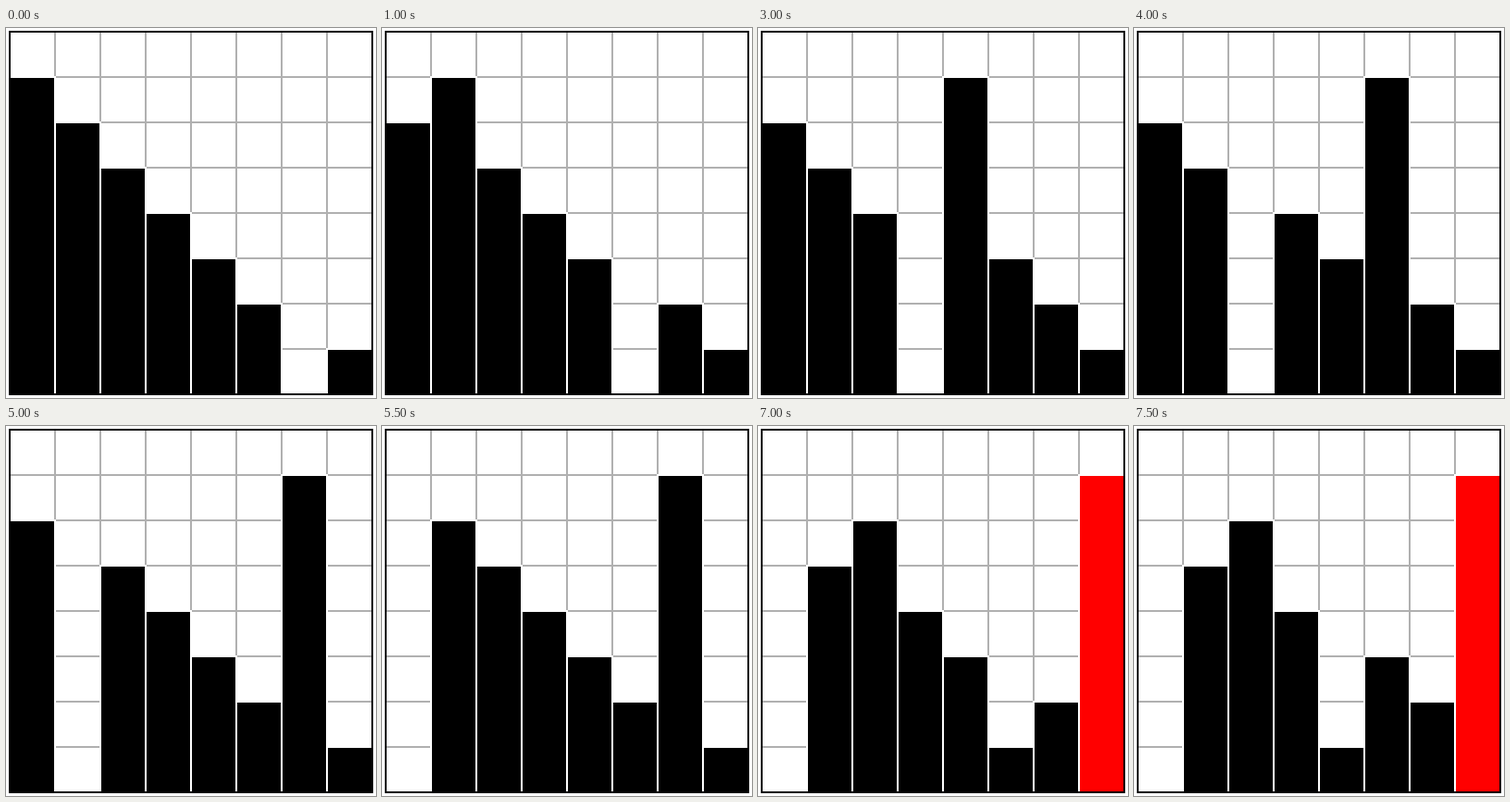
These frames come from a looping animation (400 px wide and 400 px high, 8 s). A matplotlib script:

```python
import matplotlib.pyplot as plt
from matplotlib.animation import FuncAnimation

N = 8
START = [7, 6, 5, 4, 3, 2, 0, 1]
# Left index of each neighbouring pair that is exchanged, one per step.
SWAPS = [0, 5, 1, 4, 2, 3, 2, 4, 1, 5, 0, 6, 5, 1, 4]
STEP_MS = 500
LINE = 1.44  # two pixels at 100 dpi


def sort_states():
    state = START[:]
    states = [state[:]]
    for i in SWAPS:
        state[i], state[i + 1] = state[i + 1], state[i]
        states.append(state[:])
    return states


states = sort_states()

fig = plt.figure(figsize=(4, 4), dpi=100, facecolor="white")
ax = fig.add_axes([0.01, 0.01, 0.98, 0.98])
ax.set(xlim=(0, N), ylim=(0, N), xticks=range(1, N), yticks=range(1, N))
ax.tick_params(length=0, labelbottom=False, labelleft=False)
ax.set_axisbelow(True)
ax.grid(color="#b0b0b0", linewidth=LINE)
for spine in ax.spines.values():
    spine.set_linewidth(LINE)

bars = ax.bar(range(N), START, width=1, align="edge", color="black",
              edgecolor="white", linewidth=LINE)
ax.set(xlim=(0, N), ylim=(0, N))


def update(step):
    for i, (bar, value) in enumerate(zip(bars, states[step])):
        bar.set_height(value)
        bar.set_visible(value > 0)
        # The largest value turns red once it reaches its final place.
        bar.set_facecolor("red" if value == i == N - 1 else "black")
    return list(bars)


anim = FuncAnimation(fig, update, frames=len(states), interval=STEP_MS,
                     repeat=True, repeat_delay=0, blit=False)
plt.show()
```
